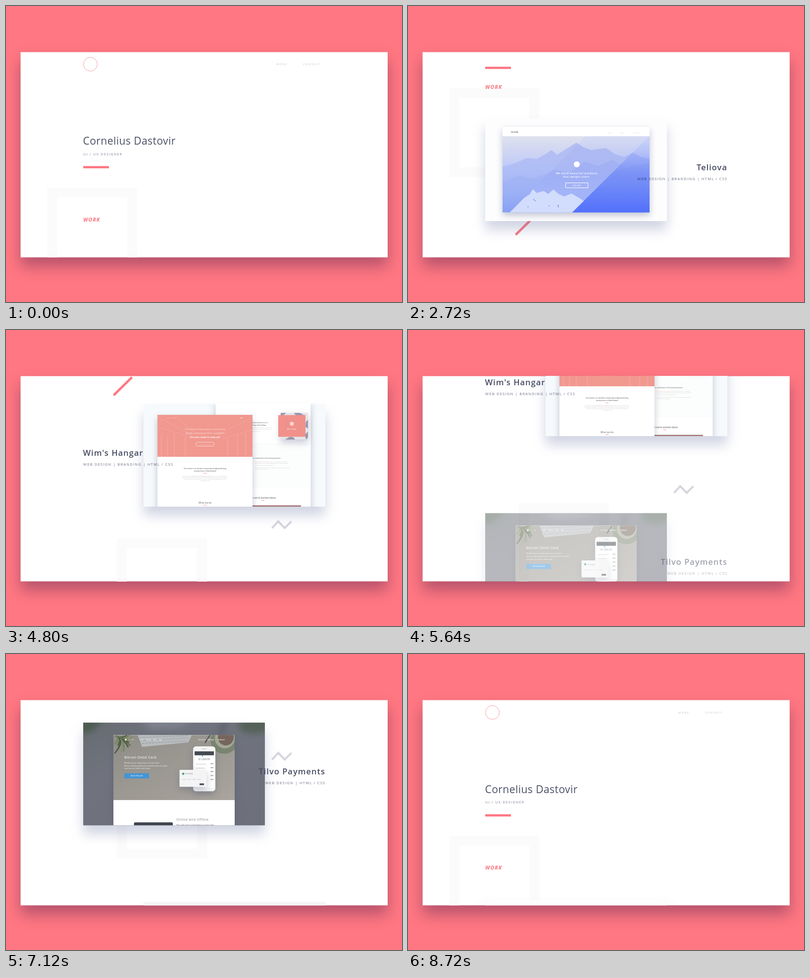
An HTML page for the animation above (8760 ms loop, 800 by 600 pixels).

```html
<!DOCTYPE html>
<html lang="en">
<head>
<meta charset="utf-8">
<title>Portfolio scroll</title>
<style>
html, body { margin: 0; width: 100%; height: 100%; overflow: hidden; background: #ff7782; }
svg { display: block; width: 800px; height: 600px; }
text { font-family: "Open Sans", "Noto Sans", sans-serif; white-space: pre; }
.window { fill: #fff; filter: drop-shadow(0 18px 15px rgba(95, 40, 80, .46)); }
.name { font-size: 21px; letter-spacing: .45px; fill: #4a5064; }
.role { font-size: 7px; font-weight: 600; letter-spacing: 1.28px; fill: #a0a4b2; }
.nav { font-size: 6px; letter-spacing: 1.2px; fill: #c6c8ce; }
.section { font-size: 10.5px; font-weight: 700; font-style: italic; letter-spacing: 1.1px; fill: #f9737c; }
.title { font-size: 16.5px; font-weight: 600; letter-spacing: 1px; fill: #454b60; }
.tags { font-size: 7.5px; letter-spacing: 1.26px; fill: #6d7286; mix-blend-mode: multiply; }
.end { text-anchor: end; }
.mid { text-anchor: middle; }
.sheet { filter: drop-shadow(0 18px 12px rgba(85, 100, 150, .27)); }
.inner { filter: drop-shadow(0 6px 7px rgba(60, 70, 110, .3)); }
.white { fill: #fff; }
.line { fill: none; stroke: #fff; }
.b { font-weight: 600; }
.l { font-weight: 300; }
.frame { fill: none; stroke: #fbfbfb; stroke-width: 20; }
</style>
</head>
<body>
<svg viewBox="0 0 800 600">
<defs>
  <clipPath id="view"><rect x="29.5" y="93.5" width="741.5" height="416"/></clipPath>
  <clipPath id="sheet"><rect width="367" height="208"/></clipPath>
  <clipPath id="peaks"><rect x="35" y="36" width="297" height="154.5"/></clipPath>
  <clipPath id="band"><path d="M49 191 203 36H331L175 191Z"/></clipPath>
  <clipPath id="desk"><rect x="61" y="25" width="245" height="132"/></clipPath>
  <clipPath id="hall"><rect x="28" y="22" width="192" height="85"/></clipPath>
  <linearGradient id="sky" x2="0" y2="1"><stop stop-color="#dfe1ee"/><stop offset=".4" stop-color="#bfcaf8"/><stop offset="1" stop-color="#86a0f4"/></linearGradient>
  <linearGradient id="mist" x2="0" y2="1"><stop stop-color="#d6dbf2"/><stop offset=".55" stop-color="#acbaf7"/><stop offset="1" stop-color="#9db0f8"/></linearGradient>
  <linearGradient id="deep" x2="0" y2="1"><stop stop-color="#cdd5f8"/><stop offset=".22" stop-color="#b4c0f9"/><stop offset=".5" stop-color="#7c94f8"/><stop offset="1" stop-color="#5270fb"/></linearGradient>
  <linearGradient id="ridge" x2="0" y2="1"><stop stop-color="#7189ef" stop-opacity=".36"/><stop offset="1" stop-color="#7189ef" stop-opacity="0"/></linearGradient>
  <linearGradient id="wood" x2="1" y2="1"><stop stop-color="#8f8d87"/><stop offset="1" stop-color="#a9a49d"/></linearGradient>
  <linearGradient id="blurred" x2="1" y2="1"><stop stop-color="#666c72"/><stop offset=".3" stop-color="#70737d"/><stop offset="1" stop-color="#6d707b"/></linearGradient>
  <filter id="soft" x="-50%" y="-50%" width="200%" height="200%"><feGaussianBlur stdDeviation="7"/></filter>
</defs>

<rect width="800" height="600" fill="#ff7782"/>
<rect class="window" x="29.5" y="93.5" width="741.5" height="416"/>

<g clip-path="url(#view)">
  <g data-rate=".75">
    <rect class="frame" x="93.5" y="378" width="161.5" height="160.5"/>
    <rect x="156" y="324.8" width="52" height="4.6" fill="#ff7782"/>
    <path d="M217.5 665.500 254.500 629" fill="none" stroke="#ff7782" stroke-width="4.6"/>
  </g>
  <g data-rate=".5">
    <rect class="frame" x="234" y="787.5" width="162" height="160"/>
    <path d="M537.500 757 550 743.500 563 757 576.500 743.500" fill="none" stroke="#d6d5de" stroke-width="4"/>
  </g>

  <g data-rate="1">
    <circle cx="170.500" cy="118.500" r="14" fill="none" stroke="#f4a3a5"/>
    <text class="nav" x="546" y="120.800">WORK</text>
    <text class="nav" x="600" y="120.800">CONTACT</text>
    <text class="name" x="155.500" y="281.500">Cornelius Dastovir</text>
    <text class="role" x="156" y="303">UI / UX DESIGNER</text>
    <text class="section" x="156" y="437">WORK</text>

    <!-- mountain site -->
    <g data-in="700 1100" transform="translate(156 497)">
      <rect class="sheet" width="367" height="208" fill="#fdfdfe"/>
      <rect class="inner white" x="35" y="17" width="297" height="173.500"/>
      <text class="b" x="51.500" y="29" font-size="3.200" letter-spacing=".35" fill="#333">TELIOVA</text>
      <g font-size="2.500" letter-spacing=".4" fill="#999">
        <text x="247" y="29.500">WORK</text><text x="272" y="29.500">ABOUT</text><text x="299" y="29.500">CONTACT</text>
      </g>
      <g clip-path="url(#peaks)">
        <rect x="35" y="36" width="297" height="155" fill="url(#sky)"/>
        <path d="M49 191 203 36H331L175 191Z" fill="url(#mist)"/>
        <path d="M331 36 175 191H332V36Z" fill="url(#deep)"/>
        <path d="M35 98 62 90 84 80 104 82 122 72 134 64 145 74 160 64 184 49 198 58 214 64 244 60 262 72 280 78 299 69 314 78 332 82V150H35Z" fill="url(#ridge)"/>
        <path d="M35 128 70 116 100 122 140 104 170 110 200 88 228 96 258 84 285 100 332 90V180H35Z" fill="url(#ridge)" opacity=".5"/>
        <g clip-path="url(#band)">
          <path d="M40 191 78 161 90 154 96 143 104 151 118 147 127 153 138 144 148 153 160 158 174 152 188 160 204 170V191Z" fill="#d2dcfd"/>
        </g>
        <path d="M97 163 102 168M128 176 130 178M148 180 147 175M86 180 87 178" fill="none" stroke="#4564cf"/>
      </g>
      <circle class="white" cx="185" cy="93" r="6"/>
      <g class="mid white b" font-size="5.200" letter-spacing=".55">
        <text x="185" y="112.500">We build beautiful products</text>
        <text x="185" y="120">that delight users.</text>
      </g>
      <rect class="line" x="162.500" y="130.500" width="45" height="10"/>
      <text class="mid white b" x="185" y="136.600" font-size="2.500" letter-spacing=".5">VIEW MORE</text>
    </g>
    <g data-in="350 600">
      <text class="title end" x="645" y="602">Teliova</text>
      <text class="tags end" x="645.500" y="622">WEB DESIGN | BRANDING | HTML / CSS</text>
    </g>

    <!-- founders' site -->
    <g data-in="3150 520" transform="translate(278 861)">
      <rect class="sheet" width="367" height="208" fill="#f7fafc"/>
      <g clip-path="url(#sheet)">
        <rect class="inner white" x="145.500" y="-6" width="192" height="230"/>
        <path d="M145.500 81H337.500V168H145.500Z" fill="#fcfdfd" stroke="#f2f4f6" stroke-width=".6"/>
        <g class="b" fill="#777">
          <text x="214" y="39" font-size="3.300">We lead students to it's</text>
          <text x="214" y="43.500" font-size="3.300">learning and trading.</text>
          <text x="210" y="111" font-size="3.100">We run a combination of fun and pain points.</text>
          <text x="210" y="192" font-size="4.700">What we're excited about</text>
        </g>
        <g font-size="2.300" fill="#aaa">
          <text x="214" y="49">Every founder gets the same support from</text>
          <text x="214" y="52.300">people who have done it all before them</text>
          <text x="214" y="55.600">and want to share it.</text>
          <text x="225" y="118"><tspan fill="#f1877f">Workshops every month</tspan> to meet the people who are building,</text>
          <text x="225" y="121.300">learning from each other and testing with real customers before</text>
          <text x="225" y="124.600">taking the next step in the journey.</text>
          <text x="225" y="129.500">Mentors who listen to what you need and help you to find a path</text>
          <text x="225" y="132.800">that works for your team.</text>
        </g>
        <path d="M238 195.500H244" stroke="#f59a95"/>
        <rect x="218" y="205.500" width="100" height="3" fill="#a0716f"/>
        <g class="inner">
          <rect x="277" y="18" width="55" height="54" fill="#e3e4e9"/>
          <path d="M277 18H288L282 23H277ZM304 18H316L326 24H308ZM328 36 332 32V50L327 46ZM286 72 294 67H302L306 72ZM326 62 332 56V68L328 72Z" fill="#9a96ae"/>
        </g>
        <rect x="272" y="22.500" width="55" height="44" fill="#f1918b"/>
        <circle cx="299.500" cy="40" r="4" fill="#fbd4d1"/>
        <text class="mid white" x="299.500" y="51.500" font-size="3">Wim's Hangar</text>

        <rect class="inner white" x="28" y="22" width="192" height="210"/>
        <rect x="28" y="22" width="192" height="85" fill="#f1988f"/>
        <g clip-path="url(#hall)" fill="none" stroke="#fff" opacity=".09">
          <path d="M28 26 96 62M28 46 90 66M60 22 104 58M220 28 150 62M220 52 160 70" stroke-width="1.500"/>
          <path d="M36 60V107M48 64V107M62 62V107M84 66V107M170 70V107M190 62V107M206 58V107" stroke-width="3"/>
        </g>
        <text class="white" x="47" y="28.800" font-size="2.400">WIM'S HANGAR</text>
        <path class="line" d="M196 27.500H199M196 28.800H199" stroke-width=".6"/>
        <g class="mid white" font-size="5">
          <text class="l" x="124" y="52.500">The best entrepreneurs in the world</text>
          <text class="l" x="124" y="60.500">deeply understand their customers</text>
          <text class="b" x="124" y="69">Are you ready to step up?</text>
        </g>
        <rect class="line" x="105.500" y="77.500" width="37" height="8" rx="4" stroke-width=".6"/>
        <text class="mid white" x="124" y="82.500" font-size="2.500">GET IN TOUCH NOW</text>
        <g class="mid" fill="#888">
          <g class="b" font-size="3.050" fill="#666">
            <text x="124" y="132">Our mission is to develop a community of high performing</text>
            <text x="124" y="136.700">entrepreneurs in New Zealand</text>
          </g>
          <g font-size="2.350" fill="#999">
            <text x="124" y="146.600">We believe that <tspan class="b">entrepreneurs can change the world</tspan>. We run a mix of events that</text>
            <text x="124" y="149.800">bring people together to share what they have learned and to challenge each other,</text>
            <text x="124" y="153">so every team can test its ideas early, find its customers and grow with the help</text>
            <text x="124" y="156.200">of a friendly crew.</text>
          </g>
          <text class="b" x="124" y="201.500" font-size="4.700">What we do</text>
        </g>
        <path d="M121 140.500H127M121 205H127" stroke="#f59a95"/>
      </g>
    </g>
    <g data-in="3100 450">
      <text class="title" x="155.500" y="966">Wim's Hangar</text>
      <text class="tags" x="156" y="986">WEB DESIGN | BRANDING | HTML / CSS</text>
    </g>

    <!-- payment site -->
    <g data-in="5380 520" transform="translate(156 1225.300)">
      <rect class="sheet" width="367" height="208" fill="#70737d"/>
      <g clip-path="url(#sheet)">
        <rect width="367" height="208" fill="url(#blurred)"/>
        <g filter="url(#soft)">
          <path d="M-10-10H44L20 16-10 26Z" fill="#4b5b50"/>
          <path d="M110-10H220L200 8 140 14Z" fill="#7f838e"/>
          <ellipse cx="345" cy="4" rx="32" ry="18" fill="#526156"/>
          <path d="M288-8 276 26" stroke="#555963" stroke-width="7"/>
        </g>
        <rect class="inner white" x="61" y="25" width="245" height="200"/>
        <g clip-path="url(#desk)">
          <rect x="61" y="25" width="245" height="132" fill="url(#wood)"/>
          <path d="M108 20 119 49 212 40 222 20Z" fill="#b9bcbe"/>
          <path d="M114 30 212 26M117 36 212 31M119 42 210 37" stroke="#a4a9ae" stroke-width="2" stroke-dasharray="5 1.500"/>
          <g id="leaves" fill="none" stroke-linecap="round"></g>
          <path d="M258 22 246 41" stroke="#55565a" stroke-width="2.500"/>
          <circle cx="285" cy="35" r="28" fill="#7a8570"/>
          <circle cx="286" cy="32" r="20" fill="#a3a797"/>
          <circle cx="288" cy="30" r="16" fill="#75655b"/>
        </g>
        <circle class="white" cx="86" cy="34.500" r="1.800"/>
        <g class="white b" font-size="2.600">
          <text x="91" y="35.700" letter-spacing=".9">TILVO</text>
          <text x="117" y="35.700">API</text><text x="127" y="35.700">Vendors</text><text x="142" y="35.700">Blog</text><text x="153" y="35.700">Help</text>
          <text x="233" y="35.700">Get a Card</text><text x="251" y="35.700">Merchants</text><text x="272" y="35.700">Dashboard</text>
        </g>
        <text class="white" x="83" y="72.500" font-size="7.200" letter-spacing=".25">Bitcoin Debit Card</text>
        <g class="white" font-size="3.200">
          <text x="83" y="83">Whether you are using it now or the next online</text>
          <text x="83" y="88.500">Bitcoin is now accepted at the merchants across the nation</text>
          <text x="83" y="94.200">more than one million cards issued.</text>
        </g>
        <rect x="83" y="102.500" width="50" height="10.500" rx="1" fill="#4495d5"/>
        <text class="mid white b" x="108" y="109" font-size="2.900">Get the Tilvo card</text>

        <g class="inner">
          <rect x="222" y="48" width="45" height="91" rx="6" fill="#f5f5f6"/>
        </g>
        <rect x="225" y="58" width="39" height="74" class="white"/>
        <rect x="225" y="58" width="39" height="8" fill="#444a50"/>
        <path d="M240 53H249" stroke="#bbb" stroke-linecap="round"/>
        <circle cx="241" cy="67.500" r="1.500" fill="#5ba7dd"/>
        <text class="mid" x="244.500" y="75.500" font-size="5.200" fill="#666">$1,200.00</text>
        <path d="M227 84H249M227 92H246M227 100H250M227 108H248M227 116H249" stroke="#b5b5b5" stroke-width=".8"/>
        <path d="M257 83H263M257 91H263M257 99H263M257 107H263M257 115H263" stroke="#bbb" stroke-width="2.500"/>
        <rect class="inner" x="194.500" y="95.500" width="55" height="34.500" rx="2" fill="#f4f4f5"/>
        <circle cx="202" cy="103.500" r="2.400" fill="#45a389"/>
        <text class="b" x="206" y="105.200" font-size="4.200" letter-spacing=".9" fill="#777">TILVO</text>
        <path d="M200 115H240" stroke="#dedee1" stroke-width="2" stroke-dasharray="8 2"/>
        <rect x="235" y="123" width="9" height="3.500" fill="#4a4d5d"/>

        <text x="188" y="199" font-size="7" letter-spacing=".3" fill="#888">Online And Offline</text>
        <text class="b" x="188" y="208.700" font-size="3.200" fill="#555">Tilvo cards can be used anywhere you shop today.</text>
        <rect x="102.500" y="202" width="78.500" height="20" rx="2.500" fill="#3f444e"/>
      </g>
    </g>
    <g data-in="5400 480">
      <text class="title end" x="645" y="1330">Tilvo Payments</text>
      <text class="tags end" x="645.500" y="1350">WEB DESIGN | HTML / CSS</text>
    </g>

    <g data-in="6850 400" transform="translate(278 1589)">
      <rect class="sheet" width="367" height="208" fill="#eeeff1"/>
    </g>
  </g>
</g>
</svg>
<script>
const LOOP = 8760;
// start ms, end ms, scroll from, scroll to
const LEGS = [
  [-125, 1515, 0, 269],
  [2899, 4539, 269, 711],
  [4892, 6532, 711, 1086],
  [7880, 8715, 1086, 0]
];
const clamp = v => Math.max(0, Math.min(1, v));
const ease = u => u < .5 ? 4 * u ** 3 : 1 - 4 * (1 - u) ** 3;

function scrollAt(t) {
  let y = 0;
  for (const [start, end, from, to] of LEGS)
    if (t >= start) y = from + (to - from) * ease(clamp((t - start) / (end - start)));
  return y;
}

// plant in the corner of the desk
const greens = ['#4d5b43', '#75825f', '#5f6e4f', '#868f70'];
let blades = '';
for (let i = 0; i < 26; i++) {
  const a = i / 25 * 1.9 - .2, r = 24 + 10 * Math.sin(i * 2.7);
  const x = 66 + Math.cos(a) * r, y = 28 + Math.sin(a) * r;
  blades += `<path d="M66 27Q${66 + r * .6} ${28 + r * .25} ${x} ${y}" stroke="${greens[i % 4]}" stroke-width="2.6"/>`;
}
document.getElementById('leaves').innerHTML = blades;

const layers = [...document.querySelectorAll('[data-rate]')].map(el => [el, +el.dataset.rate]);
const fades = [...document.querySelectorAll('[data-in]')].map(el => [el, ...el.dataset.in.split(' ').map(Number)]);

function draw(t) {
  const y = scrollAt(t);
  for (const [el, rate] of layers) el.setAttribute('transform', `translate(0 ${-y * rate})`);
  for (const [el, start, length] of fades) el.setAttribute('opacity', clamp((t - start) / length));
}

const begin = performance.now();
function tick() {
  draw((performance.now() - begin) % LOOP);
  requestAnimationFrame(tick);
}
draw(0);
requestAnimationFrame(tick);
</script>
</body>
</html>
```
